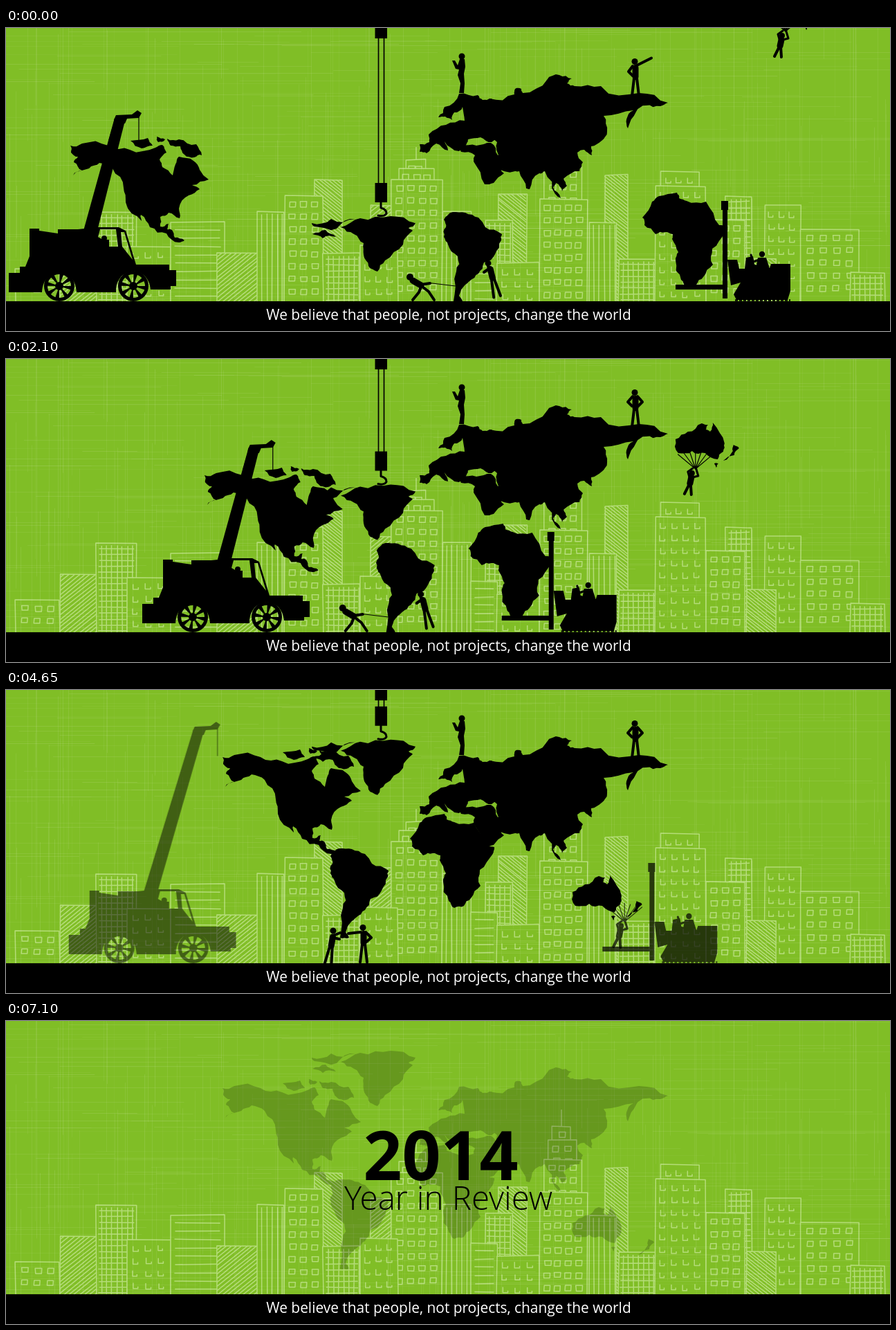
Animation of 1278 by 438 pixels, one loop 7.25 s. Source, as an HTML page:

```html
<!DOCTYPE html>
<html lang="en">
<head>
<meta charset="utf-8">
<title>Year in Review</title>
<style>
  html, body { margin: 0; width: 100%; height: 100%; overflow: hidden; background: #80be26; }
  svg { display: block; }
  text { font-family: "Open Sans", sans-serif; text-anchor: middle; }
  #city { fill: #80be26; stroke: #b4dc78; stroke-width: 1.5; stroke-linejoin: round; }
  #weave { fill: none; stroke: #fff; }
  .line { fill: none; stroke: #000; stroke-linecap: round; stroke-linejoin: round; stroke-width: 4; }
  .thin { stroke-width: 1.2; }
  .torso { stroke-width: 9; }
</style>
</head>
<body>
<svg width="1278" height="438" viewBox="0 0 1278 438">
  <defs>
    <g id="body">
      <circle r="4.5"/>
      <path class="line torso" d="M1,9V22"/>
      <path class="line" d="M-1,24L-4,50M3,24L6,50"/>
    </g>
    <g id="wheel">
      <circle r="19.5" class="line" style="stroke-width:5"/>
      <circle r="10" fill="none" stroke="#000" stroke-width="18" stroke-dasharray="3.2 4.654"/>
      <circle r="6"/>
    </g>
  </defs>
  <g id="city"></g>
  <g id="weave"></g>

  <g id="map">
    <g id="northAmerica">
      <path d="M313,97 330,94 368,97 399,103 436,100 446,96 452,107 442,117 446,128 461,140 465,124 470,113 491,119 500,132 513,146 489,154 500,160 484,169 470,188 471,202 455,194 443,200 443,214 455,210 453,218 460,219 464,230 478,234 470,237 452,224 428,215 415,197 416,206 393,179 390,158 374,130 355,122 340,130 317,140 330,133 318,121 324,113 314,107"/>
      <path d="M453,87 470,88 495,95 503,111 492,114 478,110 472,98 458,97M400,90 425,86 432,97 416,101M438,84 450,88 440,92"/>
    </g>
    <g id="greenland">
      <path d="M484,62 512,49 556,46 592,56 582,63 588,67 574,87 548,110 537,126 524,118 517,102 517,85 503,72"/>
      <path d="M442,56 470,50 505,50 478,64 446,61M443,72 462,66 477,76 458,78"/>
    </g>
    <path id="europe" d="M598,179 598,168 612,165 611,154 636,140 663,134 660,114 648,122 645,133 635,128 625,129 634,114 655,95 682,97 689,104 702,102 715,150 702,165 686,158 668,161 666,167 655,178 634,164 639,177 622,167 608,181"/>
    <path id="asia" d="M688,110 699,102 735,96 736,88 745,88 747,94 782,75 800,68 818,73 811,80 822,84 860,84 915,94 957,108 946,113 925,112 911,121 899,145 897,132 907,119 864,127 869,150 861,163 846,171 847,184 836,176 826,180 834,194 829,207 806,218 811,228 804,236 795,224 791,230 802,246 794,240 779,207 771,210 757,233 752,232 742,207 733,206 709,176 710,165 695,160"/>
    <path id="middleEast" d="M657,171 680,170 701,166 711,184 722,178 745,190 736,207 708,199 720,210 705,224 692,226 676,193 678,184 658,179"/>
    <path id="africa" d="M584,215 598,192 608,184 634,179 637,187 648,191 676,192 695,226 706,227 703,238 685,260 686,283 672,301 662,312 648,315 640,305 632,277 636,265 627,246 628,239 617,236 603,239 587,226"/>
    <path id="southAmerica" d="M469,240 482,229 500,230 519,237 529,251 553,261 552,270 543,290 527,302 519,318 506,329 500,334 491,350 496,358 483,358 487,315 489,293 475,276 469,265 472,251"/>
    <g id="australia">
      <path d="M819,292 837,281 857,269 866,271 863,278 869,281 873,268 890,298 888,310 880,321 862,312 843,309 823,312M875,327 881,327 878,333"/>
      <path id="newZealand" d="M929,315 937,320 930,330 914,338 928,324"/>
    </g>
  </g>

  <g id="crane">
    <path fill-rule="evenodd" d="M4,354H20V345H28L34,330V290H48V293L75,297V291H104L132,288H163L173,293 188,342H236V350H246V373H238V378H209C206,343 162,343 159,378V382H102C100,343 54,343 52,382H4zM136,291H159L162,316H149V306H140L133,302zM166,295H171L183,335 168,316z"/>
    <circle cx="142" cy="304" r="4"/><path d="M136,309H147V318H136z"/>
    <use href="#wheel" x="77" y="373"/><use href="#wheel" x="184" y="373"/>
    <path id="boom"/>
    <g id="boomHead">
      <path d="M156,133 159,126 182,125 190,119 196,123 192,130 175,131 172,138 156,138z"/>
      <path class="line thin" d="M192,126V168M159,128L149,162"/>
    </g>
  </g>

  <path id="hookTop" d="M533.5,0H551V15H533.5z"/>
  <path id="cables" class="line" style="stroke-width:1.7"/>
  <g id="hook">
    <path d="M533.5,224H551V252H533.5z"/>
    <path class="line" style="stroke-width:3" d="M542,252V260Q550,262 550,268Q547,273 538,271"/>
  </g>

  <g id="forklift">
    <path d="M1034,250H1044V263H1043V391H1036V263H1034z"/>
    <path d="M1043,335H1057L1060,348H1068L1070,332 1080,330 1082,342 1104,347 1106,341H1134V380L1130,393H1056L1052,385 1062,368 1048,372z"/>
    <circle cx="1093" cy="327" r="4.2"/>
    <path d="M1087,332H1099L1104,348H1084z"/>
    <path class="line" style="stroke-width:3" d="M1089,335L1080,338 1077,328"/>
    <path stroke="#000" stroke-width="2.5" stroke-dasharray="4 2" d="M1054,393.5H1134"/>
    <path id="fork" d="M968,371H1040V378H968z"/>
  </g>

  <g id="parachutist">
    <path id="cords" class="line thin"/>
    <circle cx="843" cy="341" r="4"/>
    <path class="line torso" d="M842,347L840,356"/>
    <path class="line" d="M839,357L832,371M841,357L842,372"/>
    <path class="line" style="stroke-width:3" d="M844,347L852,345 849,335M839,346L837,339 844,334"/>
  </g>

  <g id="puller">
    <circle cx="584" cy="360" r="5"/>
    <path class="line torso" d="M588,365L600,372"/>
    <path class="line" d="M600,374L597,382 588,393M602,374L611,381 619,393M588,366L600,371 613,369"/>
    <path class="line thin" d="M612,368.5L650,373"/>
  </g>
  <g id="pusher">
    <use href="#body" transform="translate(697 340) rotate(-14)"/>
    <path class="line" d="M698,348L691,353M698,348L694,334"/>
  </g>
  <g id="leftHelper">
    <use href="#body" transform="translate(473 348) rotate(10)"/>
    <path id="leftArms" class="line"/>
  </g>
  <g id="lifter">
    <use href="#body" transform="translate(510 346) rotate(-8)"/>
    <path class="line" d="M510,354L503,347"/>
  </g>

  <g id="people">
    <g id="stander">
      <use href="#body" x="516" y="343.5"/>
      <path class="line" d="M513,350L495,352M520,350L528,358 521,364"/>
    </g>
    <circle cx="659" cy="41" r="4.5"/>
    <path d="M656,45H663L664,56 662,66 663,80 662,94H655L657,80 653,68 655,60 650,59 645,47H649L653,54z"/>
    <use href="#body" x="909" y="48.5"/>
    <path id="bossArms" class="line"/>
  </g>

  <g id="title">
    <text x="628.5" y="230" font-size="98" font-weight="700">2014</text>
    <text x="639.5" y="273" font-size="47.5" font-weight="300">Year in Review</text>
  </g>
  <path d="M0,395H1278V438H0z"/>
  <text x="640" y="422" font-size="20.9" fill="#fff">We believe that people, not projects, change the world</text>
</svg>

<script>
const $ = id => document.getElementById(id);
const clamp = v => Math.max(0, Math.min(1, v));
const move = (id, x, y = 0) => $(id).setAttribute('transform', `translate(${x} ${y})`);
const fade = (id, alpha) => $(id).setAttribute('opacity', clamp(alpha));
const draw = (id, d) => $(id).setAttribute('d', d);

let seed = 7;
const random = () => (seed = seed * 16807 % 2147483647) / 2147483647;
const jitter = (v, amount = 1.6) => (v + (random() - 0.5) * amount).toFixed(1);
const line = (x1, y1, x2, y2) => `M${jitter(x1)},${jitter(y1)}L${jitter(x2)},${jitter(y2)}`;

// Coastlines: split every edge and push its middle sideways.
function roughen(points) {
  return points.flatMap(([x, y], i) => {
    const [nx, ny] = points[(i + 1) % points.length], k = (random() - 0.5) * 0.32;
    return [[x, y], [(x + nx) / 2 + (ny - y) * k, (y + ny) / 2 - (nx - x) * k]];
  });
}
for (const land of document.querySelectorAll('#map path')) {
  const parts = land.getAttribute('d').slice(1).split('M');
  land.setAttribute('d', parts.map(part =>
    `M${roughen(roughen(part.split(' ').map(p => p.split(',').map(Number)))).join(' ')}z`).join(''));
}

// Facades: / and \ hatching, # grid, = rows, | columns, o panes, u sills. Back to front.
const buildings = `o 14 348 64;/ 78 311 53;# 131 266 57;u 175 316 63;= 238 281 78;/ 305 325 66;
| 363 265 39;\\ 445 219 41;o 402 242 57;/ 526 256 31;# 459 326 53;o 577 191 30;o 567 203 53;o 557 219 73;
u 512 314 55;| 630 265 42;\\ 711 240 41;# 692 278 41;= 672 321 39;u 709 340 62;
o 790 152 27;o 783 172 42;o 778 200 54;o 771 247 69;\\ 865 213 34;| 843 281 39;# 885 334 82;
u 946 207 55;u 938 228 74;# 1041 243 38;o 1012 277 56;u 1096 256 52;\\ 1070 333 43;o 1149 291 84;# 1220 353 51`;

function facade(kind, w, h) {
  let d = '';
  if (kind === '/') for (let c = 5; c < w + h; c += 6) d += line(0, c, w, c - w * 0.8);
  if (kind === '\\') for (let c = 5 - w; c < h; c += 5) d += line(0, c, w, c + w * 0.8);
  if (kind === '#' || kind === '|') for (let x = 7; x < w; x += 7.5) d += line(x, 4, x, h);
  if (kind === '#') for (let y = 8; y < h; y += 8.5) d += line(3, y, w - 3, y);
  if (kind === '=') for (let y = 11; y < h; y += 12) d += line(6, y, w - 6, y);
  if (kind === 'o' || kind === 'u') {
    const columns = Math.round(w / 19), step = (w - 8) / columns;
    for (let y = 9; y < h - 5; y += 18)
      for (let i = 0; i < columns; i++) {
        const at = `M${jitter(step * (i + 0.5) - 0.5)},${jitter(y)}`;
        d += kind === 'o' ? `${at}h${jitter(9)}l-.5,${jitter(7.5)}h-8.5z` : `${at}v${jitter(8)}h${jitter(7)}v-3`;
      }
  }
  return d;
}

$('city').innerHTML = buildings.split(';').map(spec => {
  const [kind, ...box] = spec.trim().split(' ');
  const [x, y, w] = box.map(Number), h = 395 - y;
  return `<path d="M${x},395L${jitter(x, 3)},${y}L${jitter(x + w, 3)},${jitter(y, 3)}L${x + w},395"/>
    <svg x="${x}" y="${y}" width="${w}" height="${h}"><path fill="none" d="${facade(kind, w, h)}"/></svg>`;
}).join('') + '<path d="M593,172V191M803,128V152"/>';

// Linen weave: faint threads in both directions.
let weave = '';
for (let i = 0; i < 480; i++) {
  const x = random() * 1278, y = random() * 395, length = 60 + random() * 340;
  const thread = i % 2 ? `M${x - length / 2},${Math.round(y) + 0.5}h${length}` : `M${Math.round(x) + 0.5},${y - length / 2}v${length}`;
  weave += `<path d="${thread}" opacity="${0.03 + random() * 0.07}"/>`;
}
$('weave').innerHTML = weave;

let cords = '';
for (let i = -3; i < 4; i++) cords += `M848,335L${848 + 8.4 * i},${308 + Math.abs(i) * 2}`;
draw('cords', cords);

function render(n) {
  // Crane drives in, raises its boom, then backs out.
  const lift = clamp((n - 13.75) / 9), dx = 27 * lift, dy = -73 * lift;
  const drive = Math.min(193, 14 * n);
  move('northAmerica', drive + dx - 220, 73 + dy);
  move('crane', n < 22.5 ? drive : 193 - 12.5 * (n - 22.5));
  move('boomHead', dx, dy);
  draw('boom', `M112,293L${157 + dx},${130 + dy}L${173 + dx},${130 + dy}L132,293z`);
  fade('crane', (37.7 - n) * 0.075);

  // Hook hoists its load, then leaves through the top.
  const exit = -16 * Math.max(0, n - 35), hookY = -6.46 * n + exit;
  move('hook', 0, hookY);
  move('hookTop', 0, exit);
  draw('cables', hookY > -209 ? `M538.5,15V${224 + hookY}M546.5,15V${224 + hookY}` : '');
  move('greenland', 0, Math.max(-3, 226 - 6.46 * n));

  // Forklift delivers, lowers its fork and reverses with a slowing pace.
  const reverse = k => -312 + 58.7 * (k - 27) - 1.78 * (k - 27) ** 2;
  const africaY = 59 * (1 - clamp((n - 18.75) / 5.2));
  move('africa', Math.max(0, 336 - 17.95 * n), africaY);
  move('forklift', Math.max(-336, n < 26 ? -17.95 * n : reverse(n)));
  move('fork', 0, n < 24 ? africaY - 59 : -59 * clamp((26 - n) / 2));
  fade('forklift', (38 - n) / 10);

  // The parachutist lands on the fork and rides away.
  const fall = Math.max(0, 30 - n);
  move('australia', 9.3 * fall, -11 * fall);
  move('parachutist', n < 30 ? 9.3 * fall : reverse(n) - reverse(30), -11 * fall);
  fade('parachutist', (38 - n) / 10);
  const apart = 1 - clamp((n - 30) / 3);
  move('newZealand', -26 * apart, -15 * apart);

  // Two helpers pull, push and lift the lower continent.
  const pull = Math.max(-164, -6.95 * n);
  move('southAmerica', 164 + pull, 37 * (1 - clamp((n - 23.5) / 7.3)));
  move('puller', pull);
  move('pusher', pull - 22 * clamp((n - 23.5) / 3));
  fade('puller', n < 20);
  fade('pusher', n < 25);
  fade('leftHelper', n >= 20 ? (34 - n) / 3 : 0);
  draw('leftArms', n < 25 ? 'M473,355L480,348 486,336M472,357L485,352' : 'M473,355L483,351M472,358L482,360');
  fade('lifter', n >= 25 && n < 31);
  fade('stander', n >= 31);
  draw('bossArms', n < 10
    ? 'M912,54L920,50 933,43.5M906,55L900,63 906,69'
    : 'M906,54L899,62 905,68M913,54L920,62 914,68');

  const ending = clamp((n - 38) / 7);
  fade('map', 1 - 0.8 * ending);
  fade('people', 1 - ending);
  fade('title', ending);
}

function tick() {
  const t = performance.now() % 7250;
  render(t < 6200 ? Math.min(38, Math.floor(t / 150)) : Math.min(45, 39 + Math.floor((t - 6200) / 150)));
  requestAnimationFrame(tick);
}
tick();
</script>
</body>
</html>
```
